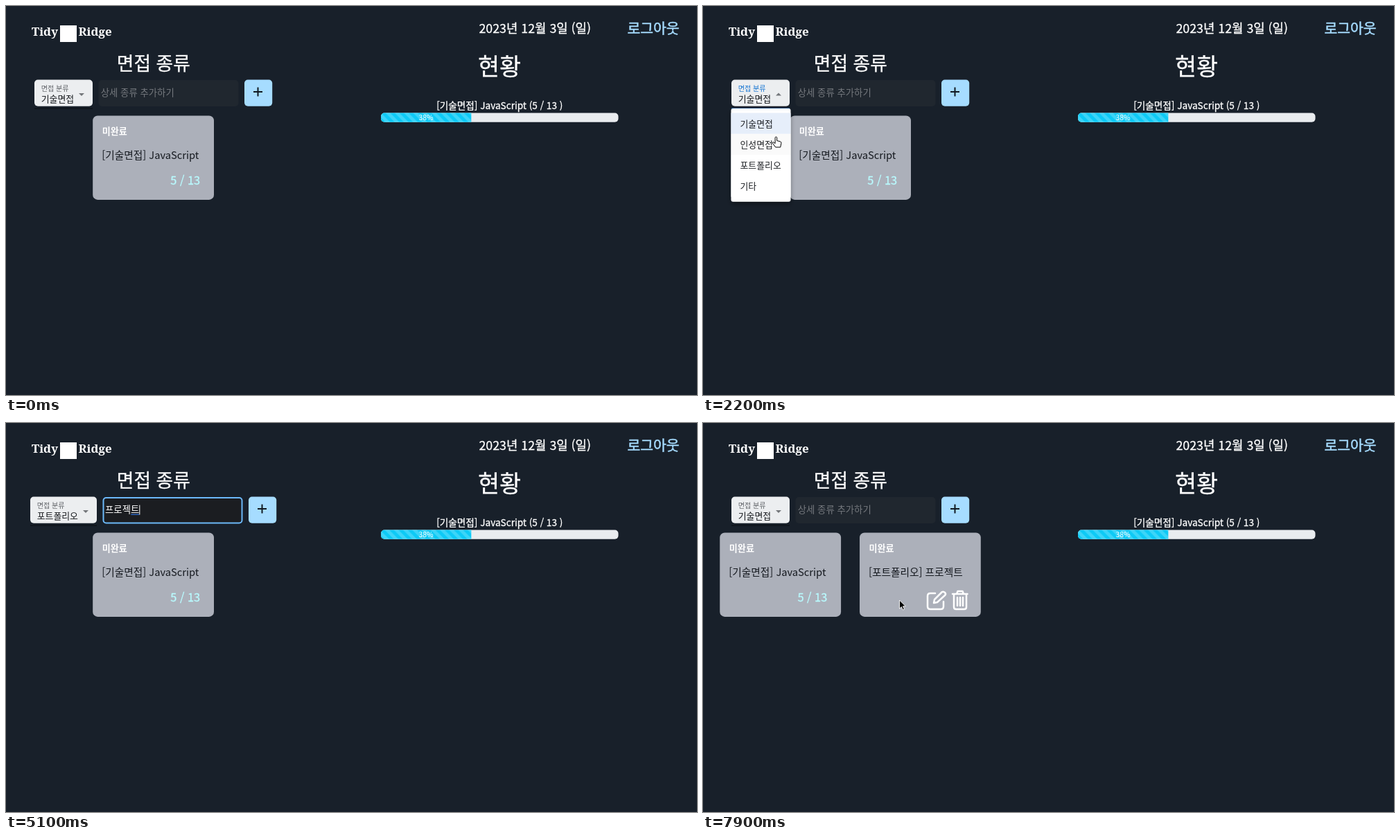
Write an HTML page that moves like this. It is 997 px wide and 562 px high and loops after 8000 ms.

```html
<!DOCTYPE html>
<html lang="ko">
<head>
<meta charset="utf-8">
<style>
html, body { margin: 0; width: 100%; height: 100%; overflow: hidden; background: #18202a; }
svg { display: block; width: 997px; height: 562px; font-family: "Noto Sans CJK KR", "Noto Sans KR", "Noto Sans CJK", sans-serif; }
text { white-space: pre; }
.brand { font: 600 17px "Noto Serif", serif; }
.firm { stroke: #fff; stroke-width: .3; }
</style>
</head>
<body>
<svg viewBox="0 0 997 562" fill="#fff">
  <defs>
    <pattern id="stripes" width="13.3" height="13.3" patternUnits="userSpaceOnUse">
      <path d="M0 0H6.65L13.3 6.65V13.3ZM0 6.65L6.65 13.3H0Z" fill="#fff" fill-opacity=".2"/>
    </pattern>
    <clipPath id="track"><rect x="541" y="154.5" width="342.5" height="13.3" rx="5"/></clipPath>
    <filter id="shadow" x="-20%" y="-20%" width="140%" height="140%">
      <feDropShadow dx="0" dy="3" stdDeviation="3" flood-opacity=".4"/>
    </filter>
    <path id="arrow" d="M0 0V12.2L2.8 9.6L4.8 14L6.9 13.1L5 8.8H8.8Z" fill="#000" stroke="#fff" stroke-width=".9"/>
    <path id="hand" d="M-.9 1.4a1.3 1.3 0 0 1 2.6 0V5.6L6.5 6.8q1.6.5 1.4 2.4L6.7 15H-.3L-4.3 9.6q-1-2 .8-2l2.6 2Z" fill="#fff" stroke="#000"/>
    <path id="beam" d="M-3-7q3 0 3 2V5q0 2-3 2M3-7q-3 0-3 2V5q0 2 3 2" fill="none" stroke="#ddd"/>
  </defs>
  <text class="brand" x="75" y="43" text-anchor="end">Tidy</text>
  <rect x="78" y="28" width="24" height="24"/>
  <text class="brand" x="104.5" y="43">Ridge</text>
  <text class="firm" x="212.8" y="93" font-size="26.8" text-anchor="middle">면접 종류</text>
  <text class="firm" x="712" y="100" font-size="33.8" text-anchor="middle">현황</text>
  <text class="firm" x="682.5" y="39" font-size="17.8">2023년 12월 3일 (일)</text>
  <text x="934" y="40" font-size="20.4" text-anchor="middle" fill="#a6dcff" stroke="#a6dcff" stroke-width=".5">로그아웃</text>
  <text class="firm" x="712.3" y="148.5" font-size="13.6" text-anchor="middle">[기술면접] JavaScript (5 / 13 )</text>
  <g clip-path="url(#track)">
    <path d="M541 154H884V169H541Z" fill="#e9ecef"/>
    <path d="M541 154H671.3V169H541Z" fill="#0dcaf6"/>
    <path d="M541 154H671.3V169H541Z" fill="url(#stripes)"/>
  </g>
  <text x="606" y="164.7" font-size="10.4" text-anchor="middle">38%</text>
  <g id="app"></g>
</svg>
<script>
const app = document.getElementById('app');
const stripes = document.getElementById('stripes');
const kinds = ['기술면접', '인성면접', '포트폴리오', '기타'];

// [time, x, y] of the pointer tip
const route = [
  [100, 176, 222], [700, 109, 124], [900, 109, 124], [1000, 109, 130], [1850, 109, 130],
  [2200, 105, 189], [2600, 100, 230], [2850, 100, 230], [3100, 138, 162], [3400, 170, 131],
  [5600, 170, 131], [6100, 375, 118.3], [7250, 375, 118.3], [7800, 283.5, 256], [8000, 283.5, 256]
];
const shapes = [[1000, 'arrow'], [2900, 'hand'], [3250, 'arrow'], [5980, 'beam'], [7350, 'hand'], [8000, 'arrow']];
const clicks = [[1000, 1250], [2800, 2950], [3450, 3600], [6200, 6450]];
const typing = [[4200, 'ㅍ'], [4300, '프'], [4400, '플'], [4500, '프로'], [4600, '프롲'], [4700, '프로제'],
  [4800, '프로젝'], [4950, '프로젴'], [5050, '프로젝트']];

const within = (t, a, b) => t >= a && t < b;
const clamp = v => Math.max(0, Math.min(1, v));
const ease = v => v * v * (3 - 2 * v);

const rect = (x, y, w, h, r, fill, more = '') =>
  `<rect x="${x}" y="${y}" width="${w}" height="${h}" rx="${r}" fill="${fill}" ${more}/>`;
const text = (x, y, size, fill, str, more = '') =>
  `<text x="${x}" y="${y}" font-size="${size}" fill="${fill}" ${more}>${str}</text>`;

function pointer(t) {
  const i = Math.max(1, route.findIndex(k => k[0] > t));
  const [a, b] = [route[i - 1], route[i]];
  const p = ease(clamp((t - a[0]) / (b[0] - a[0])));
  return [a[1] + (b[1] - a[1]) * p, a[2] + (b[2] - a[2]) * p];
}

function select(x, w, kind, open) {
  const cx = x + w - 16;
  const tip = open ? `M${cx - 4} 129.5h8l-4-4z` : `M${cx - 4} 126h8l-4 4z`;
  return rect(x, 106.5, w, 38.2, 5, '#eceef0') + rect(x, 147.5, w, 1.2, 0, open ? '#1976d2' : '#0b0f14') +
    text(x + 9.7, 123, 10.1, open ? '#1976d2' : '#62656a', '면접 분류') +
    text(x + 9.7, 139, 12.9, '#15181c', kind) + `<path d="${tip}" fill="#73767a"/>`;
}

function input(t, x, typed, focused) {
  const composing = focused && t >= 4200 && t < 5500;
  const end = x + 3 + typed.length * 12.33;
  let s = focused
    ? rect(x + .5, 108, 200, 36.5, 4, '#1b1d21', 'stroke="#6cb9fa" stroke-width="2"')
    : rect(x - .5, 107, 202, 38, 5, '#20272f');
  s += typed ? text(x + 3, 130, 13.4, '#fff', typed) : text(x + 2.7, 130, 13.4, '#74787d', '상세 종류 추가하기');
  if (composing) s += rect(end - 12, 131.5, 12, 1.3, 0, '#2f6fd6');
  if (focused && (composing || t % 1000 >= 500)) s += rect(end, 118.5, 1, 14, 0, '#fff');
  return s;
}

const button = (x, hot) => rect(x, 106.5, 40.2, 38.2, 5, hot ? '#78c9fc' : '#a6dcff') +
  `<path d="M${x + 13} 124h13M${x + 19.5} 117.5v13" stroke="#101820" stroke-width="2"/>`;

const card = (x, title, score) => rect(x, 158.5, 174.8, 121.4, 7, '#acb0ba') +
  text(x + 13.5, 186, 13.1, '#fff', '미완료', 'font-weight="700"') +
  text(x + 13, 221, 14.7, '#15191f', title) +
  text(x + 155, 257.5, 16.4, '#b9fbff', score, 'text-anchor="end" stroke="#b9fbff" stroke-width=".3"');

const icons = `<g fill="none" stroke="#fff" stroke-width="2.5" stroke-linecap="round" stroke-linejoin="round">
  <path d="M335 246H328q-4 0-4 4V265q0 4 4 4H343q4 0 4-4V258M333 260l1-5L345 244q2-1 4 1t0 4L338 259Z"/>
  <path d="M360 247H381.5M366 247l1.5-4h7l1.5 4M362 247V266q0 3 3 3H377q3 0 3-3V247M367 252v12M371 252v12M375 252v12"/></g>`;

function menu(t, y) {
  const grow = ease(clamp((t - 1150) / 220));
  const alpha = Math.min(grow, 1 - clamp((t - 2900) / 160));
  const hover = t > 1850 ? Math.floor((y - 154.5) / 30.3) : 0;
  const rows = kinds.map((kind, i) => {
    const top = 154.5 + i * 30.3;
    const fill = i === 0 ? '#e6eefa' : i === hover ? '#fafafa' : '#fff';
    return rect(40.5, top, 86, 30.3, 0, fill) + text(53.5, top + 20, 12.9, '#1c1f23', kind);
  }).join('');
  return `<g opacity="${alpha}" transform="translate(0 ${148 * (1 - grow) * .3}) scale(1 ${.7 + .3 * grow})">` +
    rect(40.5, 148, 86, 134.8, 3, '#fff', 'filter="url(#shadow)"') + rows + '</g>';
}

const ring = (x, y) => `<g fill="none"><circle cx="${x}" cy="${y}" r="26.4" stroke="#989ea5" stroke-width=".8"/>` +
  `<circle cx="${x}" cy="${y}" r="24.6" stroke="#c8ccd0" stroke-width=".9"/></g>`;

function draw(t) {
  const [px, py] = pointer(t);
  const wide = within(t, 2900, 6700), saved = t >= 6700;
  const open = within(t, 1150, 2900), focused = within(t, 3500, 6200);
  const typed = saved ? '' : (typing.filter(k => k[0] <= t).pop() || [0, ''])[1];
  const dx = wide ? 6 : 0;
  const hot = t > 5900 && px > 344 + dx && py < 145;

  let s = select(41 - dx, 84 + dx * 2, kinds[wide ? 2 : 0], open) +
    input(t, 134 + dx, typed, focused) + button(344 + dx, hot) +
    card(saved ? 24.3 : 125.2, '[기술면접] JavaScript', '5 / 13');
  if (saved) s += card(226, '[포트폴리오] 프로젝트', '');
  if (saved && py > 158) s += icons;
  if (within(t, 1150, 3060)) s += menu(t, py);
  if (clicks.some(c => within(t, ...c))) s += ring(px, py);
  if (within(t, 100, 3650) || t >= 5600)
    s += `<use href="#${shapes.find(k => t < k[0])[1]}" x="${px}" y="${py}"/>`;
  app.innerHTML = s;
  stripes.setAttribute('patternTransform', `translate(${541 + (.5 - t % 1000 / 1000) * 13.3} 154.5)`);
}

const start = performance.now();
function tick() {
  draw((performance.now() - start) % 8000);
  requestAnimationFrame(tick);
}
tick();
</script>
</body>
</html>
```
